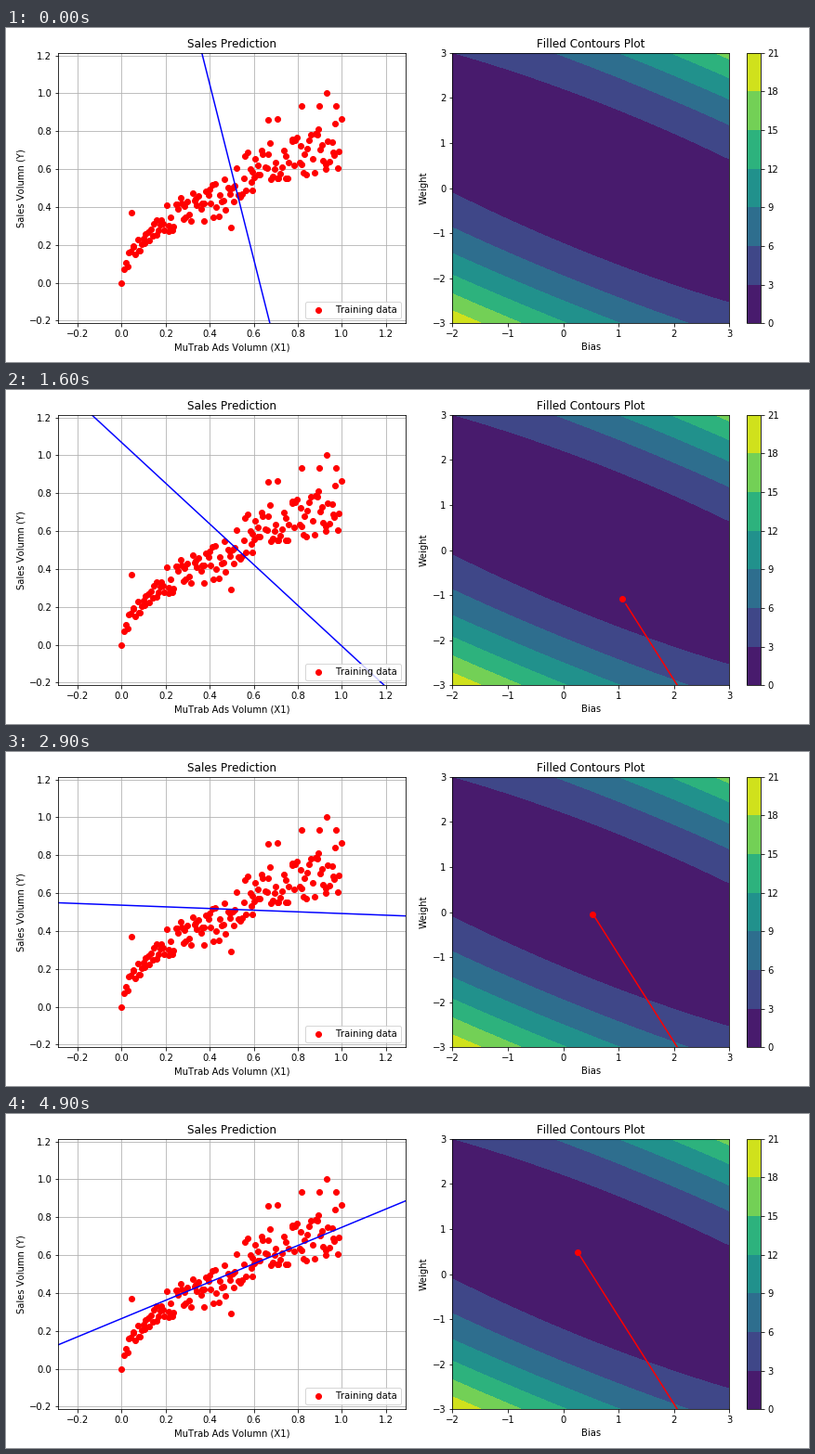
Recreate the animation shown at these times as a matplotlib script. Size 864 px wide and 360 px high, loop 5000 ms.

```python
import numpy as np
import matplotlib.pyplot as plt
from matplotlib.animation import FuncAnimation

WIDTH, HEIGHT, DPI = 864, 360, 72
TOP, BOTTOM = 26.85, 318.25
FRAMES, INTERVAL = 50, 100
SAMPLES = 140

# Least-squares fit: optimum, curvature and descent behaviour
BEST_BIAS, BEST_WEIGHT = 0.176, 0.655
MEAN_X, MEAN_X2, NOISE = 0.48, 0.311, 0.01
START_GAP, BIAS_RATIO, DECAY = 5.272, 0.5157, 0.9327


def make_samples():
    """Scatter samples inside a rising, widening band, plus a few outliers."""
    rng = np.random.default_rng(11)
    x = 0.01 + 0.98 * (np.arange(SAMPLES) + rng.random(SAMPLES)) / SAMPLES
    knots = [0, 0.1, 0.25, 0.45, 0.6, 1]
    low = np.interp(x, knots, [0.05, 0.18, 0.29, 0.34, 0.53, 0.58])
    high = np.interp(x, knots, [0.12, 0.31, 0.46, 0.57, 0.72, 0.86])
    y = low + (high - low) * rng.random(SAMPLES) ** 1.25
    outliers = [(0, 0), (0.045, 0.37), (0.497, 0.293), (0.595, 0.49),
                (0.666, 0.86), (0.708, 0.865), (0.818, 0.934),
                (0.898, 0.934), (0.932, 1), (0.975, 0.934), (1, 0.865)]
    return np.vstack([np.column_stack([x, y]), outliers]).T


def loss(weight, bias):
    dw, db = weight - BEST_WEIGHT, bias - BEST_BIAS
    return NOISE + db**2 + 2 * MEAN_X * db * dw + MEAN_X2 * dw**2


def descent(step):
    gap = START_GAP * DECAY ** np.asarray(step, dtype=float)
    return BEST_BIAS + BIAS_RATIO * gap, BEST_WEIGHT - gap


def add_axes(left, right):
    return fig.add_axes([left / WIDTH, 1 - BOTTOM / HEIGHT,
                         (right - left) / WIDTH, (BOTTOM - TOP) / HEIGHT])


plt.rcParams["font.family"] = "DejaVu Sans"
plt.rcParams["text.kerning_factor"] = 6
fig = plt.figure(figsize=(WIDTH / DPI, HEIGHT / DPI), dpi=DPI, facecolor="white")

# Data and fitted line
fit_ax = add_axes(56.3, 430.2)
fit_ax.plot(*make_samples(), "ro", label="Training data")
x_range = np.array([-0.288, 1.291])
fit_line, = fit_ax.plot([], [], color="blue")
ticks = np.arange(-1, 7) / 5
fit_ax.set(xlim=x_range, ylim=(-0.2137, 1.2137), xticks=ticks, yticks=ticks,
           title="Sales Prediction",
           xlabel="MuTrab Ads Volumn (X1)", ylabel="Sales Volumn (Y)")
fit_ax.grid(True)
fit_ax.legend(loc="lower right")

# Loss surface and descent path
loss_ax = add_axes(480.3, 778.3)
grid_x, grid_y = np.meshgrid(np.linspace(-2, 3, 200), np.linspace(-3, 3, 200))
surface = loss_ax.contourf(grid_x, grid_y, loss(grid_x, grid_y),
                           levels=np.arange(0, 22, 3), cmap="viridis")
path, = loss_ax.plot([], [], color="red")
dot, = loss_ax.plot([], [], "ro")
loss_ax.set(xlim=(-2, 3), ylim=(-3, 3), title="Filled Contours Plot",
            xlabel="Bias", ylabel="Weight",
            xticks=range(-2, 4), yticks=range(-3, 4))
fig.colorbar(surface, cax=add_axes(797.3, 811.9))


def update(step):
    bias, weight = descent(step)
    fit_line.set_data(x_range, bias + weight * x_range)
    path.set_data(*descent(np.arange(step)))  # the trail lags one step behind
    dot.set_data([bias], [weight])
    return fit_line, path, dot


animation = FuncAnimation(fig, update, frames=FRAMES, interval=INTERVAL,
                          repeat=True, repeat_delay=0)
plt.show()
```
